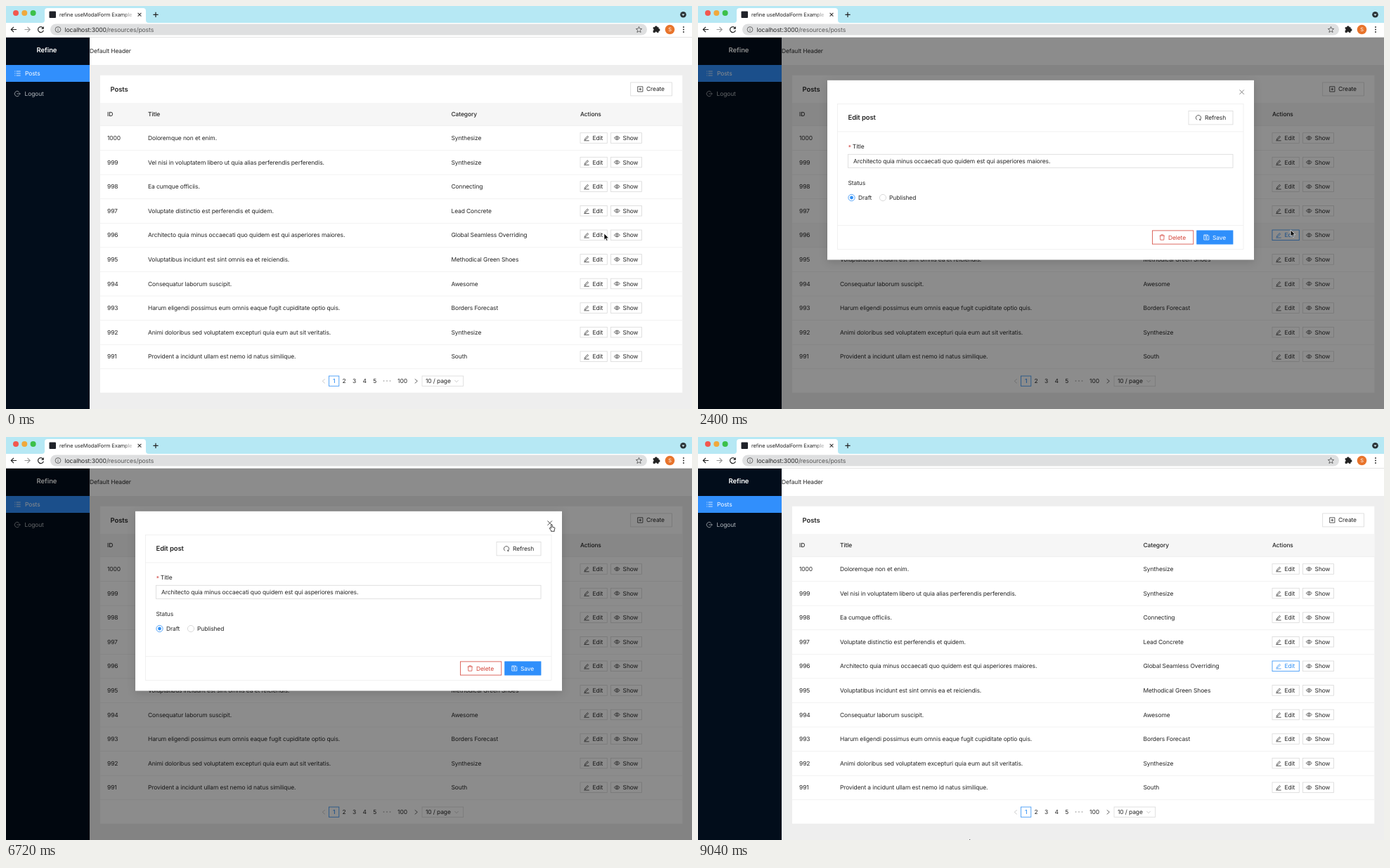
These frames come from a looping animation (976 px wide and 574 px high, 9.12 s). An HTML page:

```html
<!DOCTYPE html>
<html lang="en">
<head>
<meta charset="utf-8">
<title>Modal form</title>
<style>
html, body { margin: 0; width: 100%; height: 100%; overflow: hidden; }
svg { display: block; width: 976px; height: 574px; color: #262626; }
text { font: 8.45px Inter, Roboto, sans-serif; letter-spacing: -.1px; fill: currentColor; text-rendering: geometricPrecision; white-space: pre; }
.mid { text-anchor: middle; }
.bold { font-weight: 500; }
.head { font-size: 9.5px; font-weight: 600; }
.tab { font-size: 7.4px; }
.url { font-size: 8.6px; }
.icon { fill: none; stroke: currentColor; stroke-width: .75; }
.btn rect { fill: var(--fill, #fff); stroke: var(--line, #d9d9d9); stroke-width: .8; }
.hot { color: #2f8ff5; --line: #2f8ff5; }
.danger { color: #d4453a; --line: #d4453a; }
.primary { color: #fff; --line: #2f8ffb; --fill: #2f8ffb; }
.off { color: #c3c3c3; --line: #d9d9d9; --fill: #f5f5f5; }
#modal { filter: drop-shadow(0 3px 6px rgba(0, 0, 0, .14)); }
</style>
</head>
<body>
<svg id="stage" viewBox="0 0 976 574"></svg>
<script>
const ICONS = {
  edit: 'M-2.4 1.3L1.3-2.8L2.6-1.6L-1.1 2.3L-2.7 2.6ZM-3.7 3.8H3.7',
  eye: 'M-3.9 0Q0-5.2 3.9 0Q0 5.2-3.9 0ZM1.3 0A1.3 1.3 0 1 1-1.3 0A1.3 1.3 0 1 1 1.3 0',
  create: 'M-3.6-3.6H3.6V3.6H-3.6ZM-1.9 0H1.9M0-1.9V1.9',
  reload: 'M-2 3A3.6 3.6 0 1 1 2 3M3.5 3.2H1.8V1.5',
  trash: 'M-3.6-2.4H3.6M-1.5-2.4V-3.7H1.5V-2.4M-2.8-2.4L-2.5 3.7H2.5L2.8-2.4',
  save: 'M-3.5-3.5H2L3.5-2V3.5H-3.5ZM-1.6-3.5V-1.4H1.4V-3.5M1.1 1.1A1.1 1.1 0 1 1-1.1 1.1A1.1 1.1 0 1 1 1.1 1.1',
  spin: 'M0-3.6A3.6 3.6 0 0 1 3.6 0',
  list: 'M-4.2-3H-3.2M-1.8-3H4.2M-4.2 0H-3.2M-1.8 0H4.2M-4.2 3H-3.2M-1.8 3H4.2',
  logout: 'M2.5-2.7A3.7 3.7 0 1 0 2.5 2.7M-.6 0H4.2M2.8-1.5L4.3 0L2.8 1.5',
  close: 'M-3.2-3.2L3.2 3.2M3.2-3.2L-3.2 3.2',
  plus: 'M-3.6 0H3.6M0-3.6V3.6',
  arrow: 'M4 0H-3.6M0-3.7L-3.7 0L0 3.7',
  left: 'M1.8-3L-1.8 0L1.8 3',
  down: 'M-2.7-1.4L0 1.5L2.7-1.4',
  star: 'M0-4.3L1.2-1.4L4.2-1.2L1.9.8L2.6 3.8L0 2.2L-2.6 3.8L-1.9.8L-4.2-1.2L-1.2-1.4Z',
  info: 'M3.9 0A3.9 3.9 0 1 1-3.9 0A3.9 3.9 0 1 1 3.9 0M0-2V-1.1M0-.3V2.1',
  puzzle: 'M-4-2.6H-1.6A1.5 1.5 0 1 1 1.3-2.6H3.2V-.4A1.4 1.4 0 1 1 3.2 2.2V4.4H1.2A1.4 1.4 0 0 0-1.6 4.4H-4V1.8A1.4 1.4 0 0 0-4-.9Z'
};

const rect = (x, y, w, h, fill, more = '') =>
  `<rect x="${x}" y="${y}" width="${w}" height="${h}" fill="${fill}" ${more}/>`;
const dot = (x, y, r, fill, more = '') => `<circle cx="${x}" cy="${y}" r="${r}" fill="${fill}" ${more}/>`;
// y is the middle of the capitals
const text = (x, y, s, cls = '', more = '') => `<text x="${x}" y="${y + 3.05}" class="${cls}" ${more}>${s}</text>`;
const icon = (name, x, y, color = 'currentColor', id = '', more = '') =>
  `<g transform="translate(${x} ${y})"><path ${id && `id="${id}"`} class="icon" d="${ICONS[name]}" style="stroke:${color};${more}"/></g>`;
const button = (x, y, w, h, ic, ix, label, tx, id = '', cls = '') =>
  `<g id="${id}" class="btn ${cls}">${rect(x, y - h / 2, w, h, '#fff')}${icon(ic, ix, y)}${text(tx, y, label)}</g>`;

const POSTS = [
  ['Doloremque non et enim.', 'Synthesize'],
  ['Vel nisi in voluptatem libero ut quia alias perferendis perferendis.', 'Synthesize'],
  ['Ea cumque officiis.', 'Connecting'],
  ['Voluptate distinctio est perferendis et quidem.', 'Lead Concrete'],
  ['Architecto quia minus occaecati quo quidem est qui asperiores maiores.', 'Global Seamless Overriding'],
  ['Voluptatibus incidunt est sint omnis ea et reiciendis.', 'Methodical Green Shoes'],
  ['Consequatur laborum suscipit.', 'Awesome'],
  ['Harum eligendi possimus eum omnis eaque fugit cupiditate optio quis.', 'Borders Forecast'],
  ['Animi doloribus sed voluptatem excepturi quia eum aut sit veritatis.', 'Synthesize'],
  ['Provident a incidunt ullam est nemo id natus similique.', 'South']
];
const ACTIVE = 4, PITCH = 34.58;

const browser = () =>
  rect(0, 0, 976, 24, '#b6e8f4') +
  ['#f2584f', '#f0a93c', '#3cc04a'].map((c, i) => dot(14 + 12.3 * i, 10, 4, c)).join('') +
  '<path d="M51 24Q55 24 55 20V7Q55 3 59 3H195Q199 3 199 7V20Q199 24 203 24Z" fill="#fff"/>' +
  rect(61.5, 7.5, 9.5, 9.5, '#20232a', 'rx="1"') +
  text(76, 12.3, 'refine useModalForm Example', 'tab') + rect(166, 5, 17, 16, 'url(#fade)') +
  icon('close', 190, 12.2, '#333', '', 'scale:.75;stroke-width:1.4') +
  icon('plus', 213, 12.3, '#222', '', 'stroke-width:1.2') +
  dot(963.5, 12.3, 4.3, '#2a3438') + '<path d="M961.4 11.4H965.6L963.5 14Z" fill="#d8f2f8"/>' +
  rect(0, 24, 976, 20.5, '#fff') + rect(0, 44, 976, .6, '#d5d5d5') +
  icon('arrow', 11, 33.5, '#222', '', 'stroke-width:1.2') +
  icon('arrow', 30.5, 33.5, '#999', '', 'rotate:180deg;stroke-width:1.2') +
  '<path d="M52.6 31A4 4 0 1 0 53.4 34.6" fill="none" stroke="#222" stroke-width="1.2"/><path d="M53.8 29V32.8H50Z" fill="#222"/>' +
  rect(63, 25.5, 849, 16, '#dedfe0', 'rx="8"') + icon('info', 74, 33.5, '#444') +
  text(83.5, 33.5, 'localhost:3000<tspan fill="#555">/resources/posts</tspan>', 'url') +
  icon('star', 900.5, 33.7, '#444') + icon('puzzle', 925, 33.2, '#222', '', 'fill:#222') +
  dot(944.5, 33.5, 6.8, '#e8742c') + text(944.5, 33.4, 'S', 'tab mid', 'style="fill:#fff"') +
  [30, 33.5, 37].map(y => dot(964, y, 1, '#333')).join('');

const row = ([title, category], i) => {
  const y = +(188 + PITCH * i).toFixed(2);
  return (i == ACTIVE ? rect(134, y - 17.2, 828, 34.4, '#f8f8f8', 'id="hover"') : '') +
    text(144, y, 1000 - i) + text(202, y, title) + text(633.5, y, category) +
    button(817, y, 38.3, 14.6, 'edit', 826, 'Edit', 834.6, i == ACTIVE ? 'edit' : '') +
    button(860.4, y, 44, 14.6, 'eye', 869.3, 'Show', 877.6) +
    rect(134, y + 17.2, 828, .7, '#ececec');
};

const page = () =>
  rect(0, 44.5, 976, 529.5, '#eee') + rect(119, 44.5, 857, 39.5, '#fff') +
  text(119, 64, 'Default Header') +
  rect(0, 44.5, 119, 529.5, '#020d1b') +
  text(58, 63.3, 'Refine', 'head mid', 'style="fill:#fff"') +
  rect(0, 84, 119, 24, '#318ffc') +
  `<g color="#fff">${icon('list', 16.5, 96)}${text(27, 96, 'Posts')}</g>` +
  `<g color="#b4b8be">${icon('logout', 16, 125)}${text(26.5, 125, 'Logout')}</g>` +
  rect(134, 98.7, 828.3, 452, '#fff') + text(148.6, 118.7, 'Posts', 'head') +
  button(888.7, 118.4, 58.8, 19, 'create', 902.3, 'Create', 911) +
  rect(134, 138, 828.3, 32.5, '#f6f6f6') + rect(134, 170.2, 828.3, .7, '#ececec') +
  [[144, 'ID'], [202, 'Title'], [633.5, 'Category'], [817, 'Actions']].map(([x, s]) => text(x, 154.3, s, 'bold')).join('') +
  POSTS.map(row).join('') +
  icon('left', 452, 534.3, '#bbb') +
  rect(459.5, 527, 14.3, 14.3, '#fff', 'stroke="#2f8ff5" stroke-width=".8"') +
  text(466.6, 534, '1', 'mid bold', 'style="fill:#2f8ff5"') +
  [2, 3, 4, 5].map((n, i) => text(481 + 14.55 * i, 534, n, 'mid')).join('') +
  [537.5, 542, 546.5].map(x => dot(x, 534, 1, '#bbb')).join('') +
  text(564, 534, '100', 'mid') + icon('left', 583.5, 534.3, '#333', '', 'rotate:180deg') +
  rect(592, 527, 58.7, 14.3, '#fff', 'stroke="#d9d9d9" stroke-width=".8"') +
  text(597, 534, '10 / page') + icon('down', 641, 534.3, '#bbb');

const line = (y) => rect(198.5, y, 577.5, .7, '#ececec');
const ring = (x, id = '') => dot(x, 273, 4.6, '#fff', `${id && `id="${id}"`} stroke="#d0d0d0" stroke-width=".8"`);
const modal = () =>
  rect(184, 105.8, 607, 255.7, '#fff') + icon('close', 773.7, 122.6, '#777', 'close', 'stroke-width:.9') +
  rect(198.5, 139.4, 577.5, 207.2, 'none', 'stroke="#ececec" stroke-width=".7"') + line(178.6) + line(312) +
  text(213.5, 159.2, 'Edit post', 'head') +
  button(698, 159.2, 63, 19.4, 'reload', 712, 'Refresh', 721, 'refresh') +
  text(213.8, 200.5, '*', '', 'style="fill:#d04540"') + text(219.8, 199.8, 'Title') +
  rect(213.5, 211.3, 547.5, 19, '#fff', 'stroke="#d9d9d9" stroke-width=".8"') +
  `<g id="value">${text(221, 221, POSTS[ACTIVE][0])}</g>` +
  text(213.5, 252, 'Status') + ring(218.5, 'draft') + dot(218.5, 273, 2.4, '#2f8ff5', 'id="pick"') +
  text(228, 273, 'Draft') + ring(263) + text(272, 273, 'Published') +
  button(646.5, 329.5, 58.3, 19.2, 'trash', 660.3, 'Delete', 669, '', 'danger') +
  button(709.7, 329.5, 51.3, 19.2, 'save', 723.3, 'Save', 732, 'save') +
  icon('spin', 723.3, 329.5, '#c3c3c3', 'busy');

const stage = document.getElementById('stage');
stage.innerHTML =
  '<linearGradient id="fade"><stop stop-color="#fff" stop-opacity="0"/><stop offset="1" stop-color="#fff"/></linearGradient>' +
  page() + rect(0, 44.5, 976, 529.5, '#000', 'id="mask"') + `<g id="modal">${modal()}</g>` + browser() +
  `<g id="cursor"><path id="arrow" d="M0 0V9.2L2.1 7.3L3.5 10.4L5 9.7L3.6 6.7H6.5Z" fill="#000" stroke="#fff" stroke-width=".7"/>
  <path id="hand" d="M-1.5.5V-4a.9.9 0 0 1 1.8 0V-1.3L3.2-.7Q4-.4 3.9.6L3.2 3.2V4.8H-1.5V3.6L-3.7.9Q-4-.3-2.8 0Z" fill="#fff" stroke="#111" stroke-width=".8"/></g>`;

const el = id => document.getElementById(id);
const show = (id, on) => el(id).style.display = on ? '' : 'none';
const within = (t, a, b) => t >= a && t < b;
const clamp = v => Math.max(0, Math.min(1, v));

function bezier(x1, y1, x2, y2) {
  const at = (s, a, b) => 3 * (1 - s) ** 2 * s * a + 3 * (1 - s) * s * s * b + s ** 3;
  return x => {
    let lo = 0, hi = 1;
    for (let i = 0; i < 24; i++) {
      const s = (lo + hi) / 2;
      if (at(s, x1, x2) < x) lo = s; else hi = s;
    }
    return at(lo, y1, y2);
  };
}
const outCirc = bezier(.08, .82, .17, 1), inOutCirc = bezier(.78, .14, .15, .86);

// time, x, y
const PATH = [
  [0, 851, 324], [160, 851, 324], [480, 845, 323], [2320, 845, 323], [2880, 812, 250], [3600, 781, 150],
  [3840, 768, 130], [4240, 739, 158], [5920, 739, 158], [6400, 777, 129.5], [7920, 777, 129.5], [9040, 386, 572]
];
function cursorAt(t) {
  const i = Math.max(1, PATH.findIndex(p => p[0] >= t));
  const [t0, x0, y0] = PATH[i - 1], [t1, x1, y1] = PATH[i];
  const k = clamp((t - t0) / (t1 - t0)), e = k * k * (3 - 2 * k);
  return [x0 + (x1 - x0) * e, y0 + (y1 - y0) * e];
}

const LOOP = 9120, STEP = 80, OPEN = 1120, CLOSE = 7408;

function draw(t) {
  const zoom = t < CLOSE ? outCirc(clamp((t - OPEN) / 190)) : 1 - inOutCirc(clamp((t - CLOSE) / 200));
  const size = .2 + .8 * zoom;
  const dim = clamp((t - 1075) / 200) * (1 - clamp((t - 7430) / 200));
  show('modal', zoom > .001);
  el('modal').setAttribute('transform', `translate(845 322) scale(${size}) translate(-845 -322)`);
  el('modal').setAttribute('opacity', zoom);
  el('mask').setAttribute('opacity', .45 * dim);

  const loading = within(t, OPEN, 2000) || within(t, 4720, 5840);
  const filled = t >= 2000;
  show('value', filled);
  show('pick', filled);
  el('draft').setAttribute('stroke', filled ? '#2f8ff5' : '#d0d0d0');
  el('save').setAttribute('class', 'btn ' + (loading ? 'off' : 'primary'));
  el('save').querySelector('path').style.display = loading ? 'none' : '';
  show('busy', loading);
  const turn = loading ? t * .36 : 0;
  el('busy').setAttribute('transform', `rotate(${turn - 120})`);
  el('refresh').querySelector('path').setAttribute('transform', `rotate(${turn})`);

  const onRefresh = within(t, 4080, 6080), onClose = within(t, 6240, 7680);
  el('refresh').setAttribute('class', onRefresh ? 'btn hot' : 'btn');
  el('close').style.stroke = onClose || within(t, 3760, 3920) ? '#333' : '#777';
  show('hover', within(t, 240, 2480));
  el('edit').setAttribute('class', within(t, 240, 2480) || t >= 7600 ? 'btn hot' : 'btn');

  const [x, y] = cursorAt(t);
  el('cursor').setAttribute('transform', `translate(${x} ${y})`);
  show('hand', onRefresh || onClose);
  show('arrow', !onRefresh && !onClose);
}

const start = performance.now();
function tick() {
  const t = (performance.now() - start) % LOOP;
  draw(Math.floor(t / STEP) * STEP);
  requestAnimationFrame(tick);
}
tick();
</script>
</body>
</html>
```
